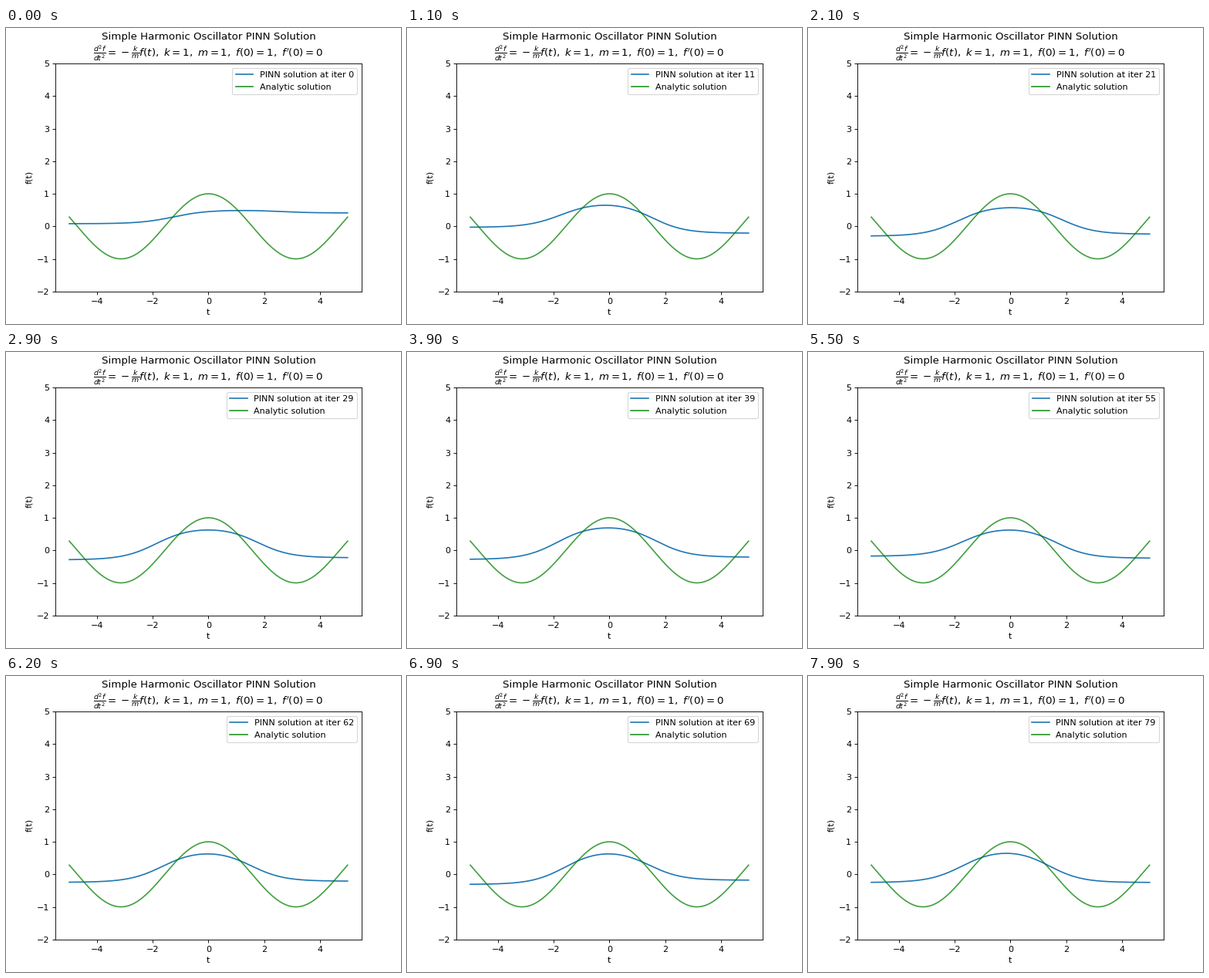
Animation of 512x384 px, one loop 8 s. Source, as a matplotlib script:

```python
import numpy as np
import matplotlib.pyplot as plt
from matplotlib.animation import FuncAnimation

FRAMES = 80
INTERVAL = 100
RISE_SLOPE, FALL_SLOPE = 1.65, 1.7

# iteration: left level, top, right level, centre of rise, centre of fall
STAGES = {
    0: (.08, .50, .41, -1.25, 2.60),
    11: (-.03, .755, -.21, -1.72, 1.52),
    21: (-.30, .65, -.24, -1.87, 1.85),
    39: (-.28, .79, -.21, -1.86, 1.68),
    55: (-.18, .73, -.24, -1.70, 1.64),
    69: (-.31, .785, -.18, -1.57, 1.40),
    79: (-.25, .79, -.25, -1.71, 1.38),
}
STEPS = list(STAGES)
PARAMS = list(zip(*STAGES.values()))


def sigmoid(x):
    return 1 / (1 + np.exp(-x))


def network(t, step):
    """A smooth hump between two levels, drifting as training goes on."""
    left, top, right, rise, fall = (np.interp(step, STEPS, p) for p in PARAMS)
    return (left + (top - left) * sigmoid(RISE_SLOPE * (t - rise))
            - (top - right) * sigmoid(FALL_SLOPE * (t - fall)))


t = np.linspace(-5, 5, 201)
fig, ax = plt.subplots(figsize=(6.4, 4.8), dpi=80)
pinn, = ax.plot(t, network(t, 0), color="tab:blue")
ax.plot(t, np.cos(t), color="g", alpha=0.75, label="Analytic solution")
ax.set_xlim(-5.5, 5.5)
ax.set_ylim(-2, 5)
ax.set_xlabel("t")
ax.set_ylabel("f(t)")
ax.set_title("Simple Harmonic Oscillator PINN Solution\n"
             r"$\frac{d^2f}{dt^2}=-\frac{k}{m}f(t),\ k=1,\ m=1,"
             r"\ f(0)=1,\ f'(0)=0$")


def update(step):
    pinn.set_ydata(network(t, step))
    pinn.set_label(f"PINN solution at iter {step}")
    legend = ax.legend(loc="upper right")
    legend.legend_handles[1].set_alpha(0.85)
    return pinn, legend


anim = FuncAnimation(fig, update, frames=FRAMES, interval=INTERVAL,
                     repeat=True, repeat_delay=0)
plt.show()
```
